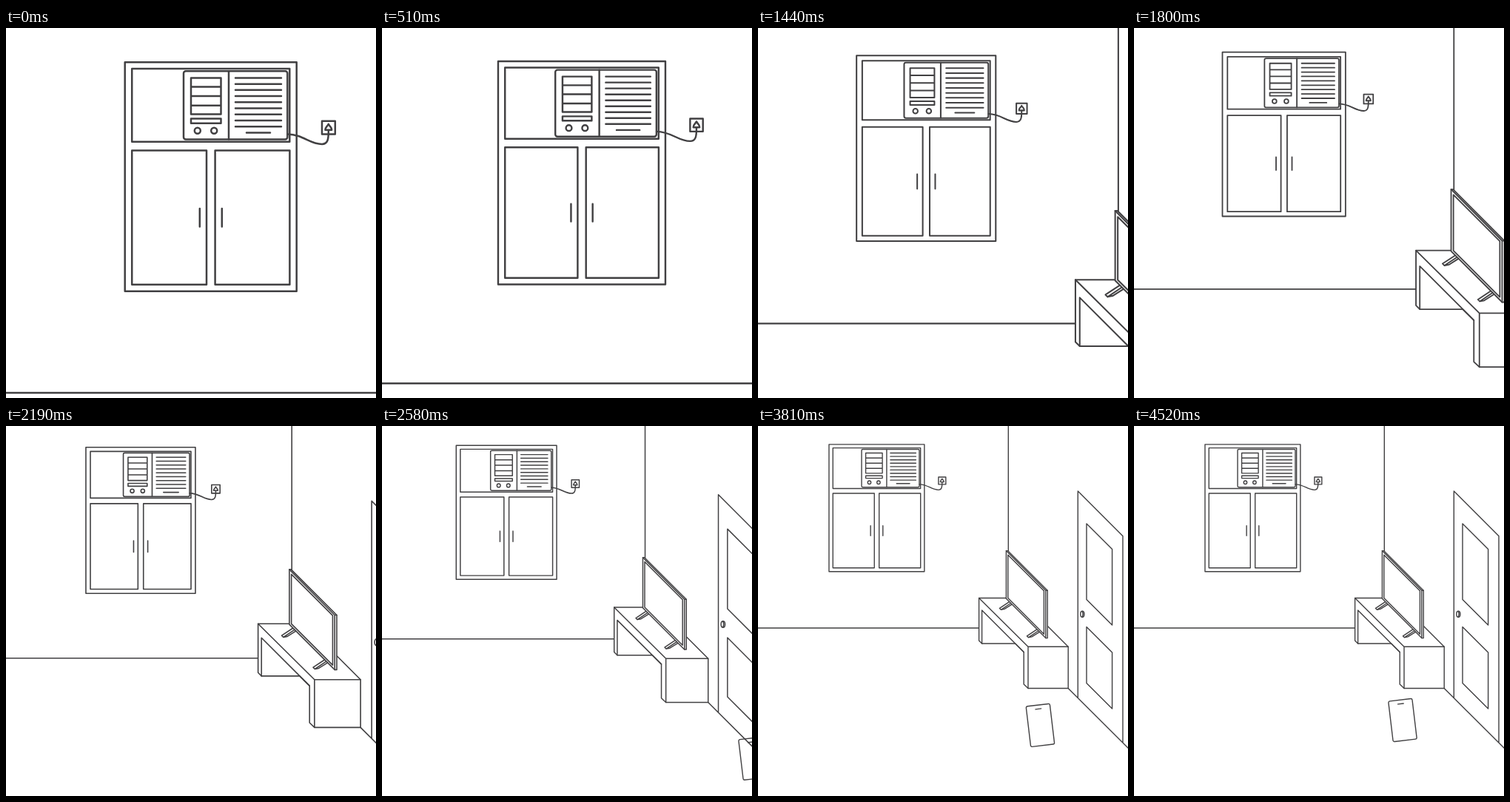
These frames come from a looping animation (500x500 px, 5110 ms). An HTML page:

```html
<!DOCTYPE html>
<html lang="en">
<head>
<meta charset="utf-8">
<title>Room zoom</title>
<style>
  html, body { margin: 0; width: 100%; height: 100%; overflow: hidden; background: #fff; }
  svg { display: block; width: 100%; height: 100%; }
  svg * { stroke-linecap: round; stroke-linejoin: round; }
</style>
</head>
<body>
<svg viewBox="0 0 500 500" fill="none" stroke="#414042" stroke-width="1.4">
  <g id="room">
    <path d="M-20 273H298.6M338.3 -20V180"/>

    <!-- cabinet, air conditioner and socket, drawn at 1.8x -->
    <g transform="translate(6.667 -.889) scale(.5556)" stroke-width="2.5">
      <path d="M160.7 46.3H392.7V355.7H160.7ZM170.2 55H383.3V153.8H170.2Z"/>
      <path d="M170.2 165.5H271V346.8H170.2ZM282.6 165.5H383.4V346.8H282.6ZM261.8 244V268.5M291.8 244V268.5"/>
      <rect x="240" y="58.2" width="140.3" height="92.4" rx="3" fill="#fff"/>
      <path d="M301 58.2V150.6M250 67.4H290.5V116.5H250ZM250 79.5H290.5M250 92H290.5M250 104.7H290.5M250 122.6H290.5V128.7H250ZM325 141.6H357"/>
      <path id="vents"/>
      <circle cx="258.8" cy="138.8" r="4"/>
      <circle cx="281.2" cy="138.8" r="4"/>
      <path d="M380.5 143.6C402 144 410 157 427 157C435 157 436 150 435.8 138.5M427 125.8H444.8V143.6H427Z"/>
      <path d="M431.4 137.8C431.2 134 434 133.5 435.8 129.8C437.6 133.5 440.4 134 440.2 137.8Z"/>
    </g>

    <!-- bench -->
    <g fill="#fff">
      <path d="M298.6 232.5H353.5L419.2 298.2V354.5H365L359.2 349V305.5L347.6 294H302.6L298.6 290Z"/>
      <path d="M298.6 232.5L365 298.2H419.2M365 298.2V354.5M302.6 294V249L359.2 305.5" fill="none"/>
    </g>

    <!-- television -->
    <g fill="#fff">
      <path id="foot" d="M339.5 237.7L326.4 246.3L328.4 248.3L333 247.4L343.8 240.6M328.4 248.3L341.5 239.5"/>
      <use href="#foot" x="37" y="37.5"/>
      <path d="M335.4 168.6H337.5L391.2 222.3V286.6H388.8L335.4 233.2Z"/>
      <path d="M335.4 168.6L388.8 222.3V286.6M388.8 222.3H391.2M337.8 174.2L386.4 222.8V281.2L337.8 232.6Z"/>
    </g>

    <!-- door -->
    <path d="M419.2 354.5L540 475M432.3 367.5V88L493 148.7V428"/>
    <path d="M444 132L478.6 166.6V269L444 234.4ZM444 271.5L478.6 306.1V382L444 347.4Z"/>
    <ellipse cx="438.3" cy="254.3" rx="2.6" ry="4"/>
    <path d="M438.3 250.4Q440.2 254.3 438.3 258.2"/>
  </g>

  <g id="phone">
    <rect width="32.3" height="55" rx="2"/>
    <path d="M12.3 5.3H20"/>
  </g>
</svg>
<script>
  const $ = id => document.getElementById(id);
  const LOOP = 5110;

  $("vents").setAttribute("d",
    Array.from({ length: 9 }, (_, i) => `M310 ${67.4 + i * 8.23}H372`).join(""));

  const easeInOut = u => u < .5 ? 2 * u * u : 1 - 2 * (1 - u) ** 2;

  function draw(t) {
    // the room shrinks towards the point (15, -2)
    const u = Math.min(1, (t + 35) / 3200);
    const s = 1.8 - .8 * easeInOut(u);
    $("room").setAttribute("transform", `translate(15 -2) scale(${s}) translate(-15 2)`);

    // the phone slides in on its own, slowing to a stop
    const d = (Math.max(0, 4520 - t) * .00606) ** 2;
    $("phone").setAttribute("transform", `translate(${343.7 + d} ${372.1 + d * .375}) rotate(-6.8)`);
  }

  const start = performance.now();
  function tick() {
    draw((performance.now() - start) % LOOP);
    requestAnimationFrame(tick);
  }
  tick();
</script>
</body>
</html>
```
